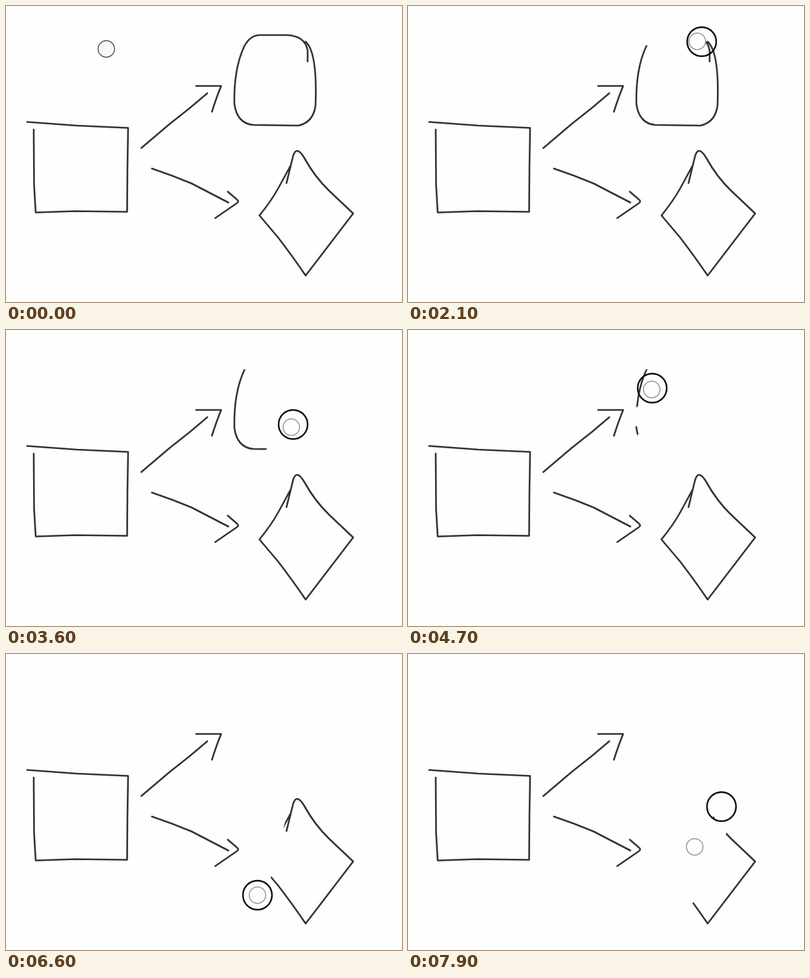
Recreate the animation shown at these times as an HTML page with a canvas. Size 600 by 448 pixels, loop 8 s.

```html
<!DOCTYPE html>
<html lang="en">
<head>
<meta charset="utf-8">
<title>Eraser</title>
<style>
  html, body { margin: 0; width: 100%; height: 100%; overflow: hidden; background: #fefdff; }
  canvas { display: block; }
</style>
</head>
<body>
<canvas id="stage" width="600" height="448"></canvas>
<script>
const ctx = document.getElementById('stage').getContext('2d');
ctx.lineCap = ctx.lineJoin = 'round';

const INK = '#333335', PAPER = '#fefdff', LINE = 2.6;
// Times are in ticks of a tenth of a second.
const LOOP = 80, LAG = 0.7, PRESS = 10, RUB_START = 12, RUB_VISIBLE = 13;

const box = 'M32 175.5L107 181 185 184.5 184 245 183.5 311.5 105 310.5 45 312.5 42.5 270 42 187';
const upArrow = 'M205 215L248 178.5 279 154 305 132M288 121H326Q319 138 312 160';
const downArrow = 'M221 246L252 257 281 268.5 337 297.5M336 281L350 293Q354 296 349 299L317 321';
const roundedBox = `M457 84V67Q453 45 425 44H385Q370 44 361 61Q345 95 346 148Q350 178 375 180
  L443 181Q466 176 469 150Q472 70 454 54`;
const diamond = `M432 240L413 275Q402 295 384 317L412 350Q435 380 454 408L526 314 490 280
  Q468 259 452 230Q440 210 435 227L425 268`;
const kept = new Path2D(box + upArrow + downArrow);
const erasable = new Path2D(roundedBox + diamond);

// The pointer rests until each glide starts, then visits its points at an even pace.
const route = [{ t: 0, x: 152, y: 65 }];
function glide(start, pace, ...points) {
  route.push({ ...route.at(-1), t: start });
  points.forEach(([x, y], i) => route.push({ t: start + pace * (i + 1), x, y }));
}
glide(0, 2.3, [197, 76]);
glide(4.2, 5.8, [356, 46]);
// Around the rounded box
glide(12, 1, [368, 47]);
glide(13, 8, [445, 54]);
glide(21, 3.5, [468, 110], [462, 147]);
glide(28, 1, [442, 177], [484, 137]);
glide(30, 2.75, [398, 199], [435, 143]);
glide(36, 2, [374, 186], [358, 167], [407, 125], [348, 133]);
glide(44, 1, [374, 110], [369, 91], [370, 88]);
glide(47, 3, [358, 41], [343, 120], [346, 200], [346, 166], [359, 247]);
// Across the diamond
glide(63, 1.1, [410, 252], [381, 365]);
glide(66, 1.5, [393, 310], [447, 177], [430, 285], [473, 193]);
glide(72, 1, [504, 195]);
glide(73, 3, [422, 368]);
glide(76, 1, [403, 346], [417, 318], [475, 231]);

function pointerAt(t) {
  const i = route.findIndex(key => key.t > t);
  if (i < 0) return [route.at(-1).x, route.at(-1).y];
  const a = route[Math.max(0, i - 1)], b = route[i];
  const k = Math.max(0, (t - a.t) / (b.t - a.t));
  return [a.x + (b.x - a.x) * k, a.y + (b.y - a.y) * k];
}

function ring([x, y], radius, color, width, fill = 'transparent') {
  ctx.beginPath();
  ctx.arc(x, y, radius, 0, Math.PI * 2);
  ctx.fillStyle = fill;
  ctx.fill();
  ctx.strokeStyle = color;
  ctx.lineWidth = width;
  ctx.stroke();
}

function eraseUntil(t) {
  ctx.globalCompositeOperation = 'destination-out';
  ctx.lineWidth = 26;
  ctx.beginPath();
  for (const key of route) if (key.t >= RUB_START && key.t < t) ctx.lineTo(key.x, key.y);
  ctx.lineTo(...pointerAt(t));
  ctx.stroke();
}

function draw(t) {
  const cursor = pointerAt(t - LAG);
  ctx.clearRect(0, 0, 600, 448);
  ctx.strokeStyle = INK;
  ctx.lineWidth = LINE;
  ctx.stroke(erasable);
  if (t > RUB_VISIBLE) eraseUntil(t - LAG);

  ctx.globalCompositeOperation = 'destination-over';
  ctx.fillStyle = PAPER;
  ctx.fillRect(0, 0, 600, 448);
  ctx.globalCompositeOperation = 'source-over';
  ctx.lineWidth = LINE;
  ctx.stroke(kept);

  if (t < PRESS) {
    ring(cursor, 12.5, '#4c4c4e', 1.4, '#f8f7f8');
  } else {
    ring(cursor, 12.5, '#959496', 1.5);
    ring(pointerAt(t), 22, '#0c0c0c', 2.4);
  }
}

// The picture advances ten times a second.
function frame(now) {
  draw(Math.floor(now / 100) % LOOP);
  requestAnimationFrame(frame);
}
requestAnimationFrame(frame);
</script>
</body>
</html>
```
